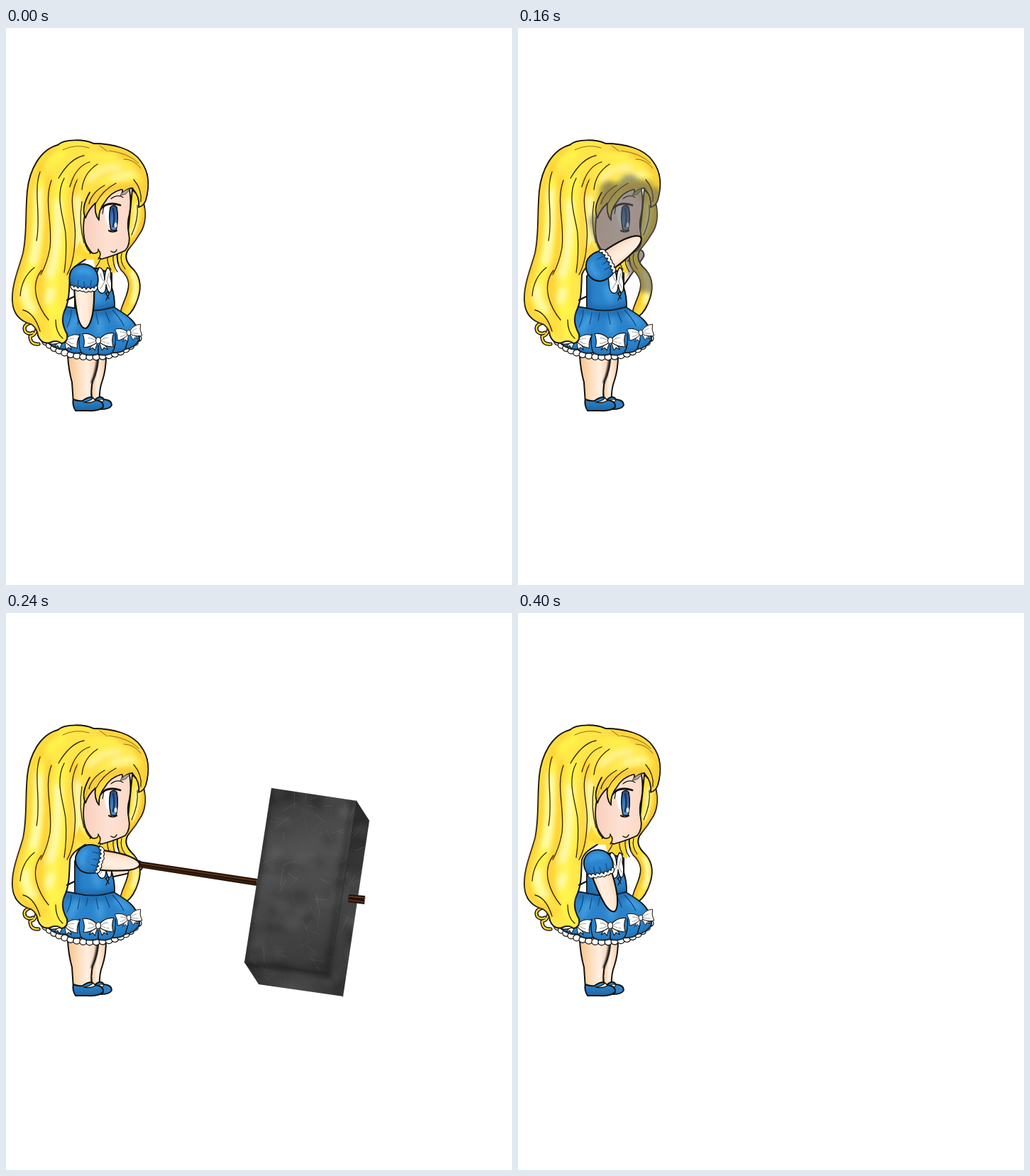
Write an HTML page with a canvas that moves like this. It is 713 px wide and 786 px high and loops after 0.48 s.

```html
<!DOCTYPE html>
<html lang="en">
<head>
<meta charset="utf-8">
<title>Girl with hammer</title>
<style>
  html, body { margin: 0; width: 100%; height: 100%; overflow: hidden; background: #fff; }
  canvas { display: block; }
</style>
</head>
<body>
<canvas id="stage" width="713" height="786"></canvas>
<script>
const ctx = document.getElementById('stage').getContext('2d');
const INK = '#14110c', BROWN = '#33250a', BLUE = '#2a83cb', NAVY = '#10487f', SKIN = '#ffe6d2';
const STEP = 80;

// near arm: shoulder and angle; far arm: from, to
const POSES = [
  { arm: [110, 348, 90] },
  { arm: [112, 341, -11], far: [142, 362, 183, 335] },
  { arm: [111, 339, -34], far: [142, 360, 170, 320], smoke: true },
  { arm: [113, 346, 8], far: [140, 367, 185, 357], hammer: true },
  { arm: [115, 348, 43], far: [142, 360, 174, 396] },
  { arm: [112, 349, 73] }
];

function shape(d, fill, line = INK, width = 2) {
  const p = new Path2D(d);
  if (fill) { ctx.fillStyle = fill; ctx.fill(p); }
  if (line) { ctx.strokeStyle = line; ctx.lineWidth = width; ctx.stroke(p); }
}

function lines(list, color = INK, width = 1.5) {
  list.forEach(d => shape(d, null, color, width));
}

function ribbon(list, color, width, edge) {
  lines(list, INK, width + edge);
  lines(list, color, width);
}

function within(d, draw) {
  ctx.save();
  ctx.clip(new Path2D(d));
  draw();
  ctx.restore();
}

function soft(list, color, width, blur) {
  ctx.save();
  ctx.filter = `blur(${blur}px)`;
  lines(list, color, width);
  ctx.restore();
}

function blob(x, y, rx, ry, fill, line, width = 1.5) {
  ctx.beginPath();
  ctx.ellipse(x, y, rx, ry, 0, 0, 7);
  ctx.fillStyle = fill;
  ctx.fill();
  if (line) { ctx.strokeStyle = line; ctx.lineWidth = width; ctx.stroke(); }
}

function fade(x0, y0, x1, y1, ...colors) {
  const g = ctx.createLinearGradient(x0, y0, x1, y1);
  colors.forEach((c, i) => g.addColorStop(i / (colors.length - 1), c));
  return g;
}

function seeded(s) {
  return () => (s = (s * 16807) % 2147483647) / 2147483647;
}

function bow(x, y, size, turn) {
  ctx.save();
  ctx.translate(x, y);
  ctx.rotate(turn);
  ctx.scale(size, size);
  for (const side of [-1, 1]) {
    ctx.save();
    ctx.scale(side, 1);
    shape('M1 2 L5 14 L8 10 L13 13 Q10 6 3 1Z', '#fff', INK, 1);
    shape('M2 -2 C8 -9 15 -11 22 -10 Q18 -1 21 9 Q12 10 2 3Z', '#fff', INK, 1.1);
    lines(['M5 -1 Q10 -4 14 -4', 'M5 1 Q10 4 15 4'], '#999', 1);
    ctx.restore();
  }
  blob(0, 0, 3.5, 4.5, '#fff', INK, 1.1);
  ctx.restore();
}

function farArm([x0, y0, x1, y1]) {
  ribbon([`M${x0} ${y0} L${x1} ${y1}`], SKIN, 13, 4);
}

function sideLock() {
  const d = 'M178 228 L193 243 Q200 268 191 286 Q183 300 172 313 Q165 325 176 337 C190 350 191 366 186 381 ' +
    'Q180 400 170 407 Q160 405 162 399 C165 386 173 376 173 361 Q172 350 162 341 Q155 331 157 315 L172 288Z';
  shape(d, '#ffe140');
  within(d, () => {
    soft(['M195 254 Q196 280 172 309', 'M160 335 Q180 355 174 375 L164 400'], '#f6bb2a', 4, 2);
    soft(['M184 250 Q184 275 178 290', 'M178 346 Q187 362 179 386'], '#fffbb0', 6, 2);
  });
  lines(['M185 250 Q187 270 177 292', 'M163 318 Q160 330 168 340'], BROWN, 1.2);
}

function legs() {
  shape('M118 462 Q124 490 120 512 L121 526 L132 525 Q131 510 136 497 Q141 482 141 462Z',
    fade(118, 0, 140, 0, '#f0bd96', '#fff2e4', '#f6cca6'));
  shape('M87 462 Q88 482 93 500 L95 530 L121 530 Q119 512 122 498 Q130 482 130 462Z',
    fade(88, 0, 128, 0, '#f9c393', '#fddbb8', '#fff0e0', '#f8d3b2'));
  soft(['M121 500 Q127 486 129 468'], '#222', 3, .8);
  shape('M123 527 Q133 516 138 524 Q149 525 149 532 Q147 538 134 538Z', BLUE);
  shape('M131 525 Q135 522 138 526 Q134 529 131 529Z', SKIN, INK, 1);
  shape('M95 524 Q101 527 108 526 Q114 521 121 521 L125 525 Q138 526 137 535 Q131 541 115 540 L98 540 Q93 532 95 524Z',
    fade(0, 522, 0, 541, '#2d8bd6', '#1d639f'));
  shape('M109 528 Q119 530 126 526 L123 522 Q116 528 109 528Z', SKIN, INK, 1.2);
}

function lace() {
  const n = 17;
  for (let i = 0; i <= n; i++) {
    const t = i / n, u = 1 - t;
    const at = (a, b, c, e) => u * u * u * a + 3 * u * u * t * b + 3 * u * t * t * c + t * t * t * e;
    blob(at(56, 84, 162, 186), at(443, 471, 474, 438), 5, 4.5, '#fff', INK, 1.2);
  }
}

function skirt() {
  const d = 'M84 393 Q118 401 152 394 C165 402 178 410 183 420 Q188 427 188 440 Q180 452 168 453 Q162 459 150 458 ' +
    'Q140 464 130 460 Q115 464 106 458 Q92 461 84 453 Q70 455 57 442 Q58 430 70 418 Q79 405 84 393Z';
  lace();
  shape(d, BLUE);
  within(d, () => {
    soft(['M66 450 Q125 480 186 446', 'M82 398 Q118 407 154 399'], '#1c68ac', 7, 4);
    soft(['M100 408 L90 427', 'M132 412 L132 428', 'M156 406 L170 416'], '#4aa3e2', 9, 4);
  });
  lines(['M92 398 Q92 410 86 422', 'M104 402 L101 418', 'M115 402 L113 413', 'M127 402 L130 418',
    'M140 400 L146 415', 'M150 398 Q160 408 166 420'], NAVY, 1.2);
  lines(['M106 458 Q101 446 104 432', 'M130 460 L130 448', 'M150 458 Q156 446 154 432', 'M168 453 L172 440'], INK, 1.4);
  bow(82, 440, .95, .15);
  bow(130, 441, 1, -.02);
  bow(173, 430, .84, -.2);
}

const BACK = 'M123 163 C112 157 82 156 73 165 C48 172 33 200 30 230 C27 262 30 290 24 318 C18 340 8 362 9 385 ' +
  'C10 403 20 414 36 418 Q44 424 45 434 Q50 447 62 444 ' +
  'Q72 439 78 445 Q88 443 86 432 C81 423 77 412 82 400 C90 385 89 365 90 348 C94 335 106 332 118 322 L130 250 L160 180Z';

function backHair() {
  ribbon(['M35 416 Q23 419 27 428 Q31 433 38 430', 'M43 425 Q41 434 34 435 Q34 447 46 446'], '#fdd32e', 2.4, 2.8);
  shape(BACK, '#ffe84a');
  within(BACK, () => {
    soft(['M68 172 C28 205 38 260 30 310 Q12 350 13 390 Q28 412 50 425', 'M60 210 C52 260 64 300 48 350 Q40 385 66 425',
      'M98 210 C88 255 104 300 86 345'], '#fcc02c', 6, 4);
    soft(['M48 215 C40 260 50 300 34 345 Q22 375 34 400', 'M80 215 C66 260 84 300 70 345 Q60 380 74 405',
      'M62 390 Q62 425 76 436', 'M60 190 L78 178'], '#fff64a', 11, 4);
    soft(['M46 230 Q48 290 38 330', 'M73 245 Q76 300 62 350', 'M101 240 L103 305', 'M28 365 Q24 385 38 398',
      'M64 370 L60 385'], '#fffcc8', 9, 4);
  });
  lines(['M48 203 C38 230 50 265 43 300', 'M64 215 C53 245 66 275 62 310 Q58 332 49 348',
    'M82 212 C68 238 82 270 84 290 Q86 320 82 345', 'M101 213 C84 245 101 270 97 300 Q96 330 86 348',
    'M20 378 Q22 352 40 338', 'M50 342 C32 365 46 395 60 412', 'M24 398 Q40 402 48 428',
    'M70 412 Q70 430 80 438', 'M107 245 Q102 275 110 303'], BROWN, 1.3);
}

function bodice() {
  shape('M122 320 L155 316 L154 346 L126 340Z', '#fbd83a', null);
  lines(['M134 324 Q131 332 127 337', 'M143 322 Q142 332 148 341', 'M151 320 Q150 335 157 344'], BROWN, 1.3);
  lines(['M86 384 L98 378'], INK, 2.2);
  const d = 'M97 350 Q104 341 118 340 Q128 337 136 342 L149 346 L149 366 Q153 378 153 393 Q125 403 97 395Z';
  shape(d, BLUE);
  within(d, () => {
    soft(['M98 355 L98 394 Q125 403 154 391'], '#175b9c', 6, 4);
    soft(['M125 366 L130 383'], '#46a0e2', 9, 4);
  });
  shape('M139 356 Q138 338 131 338 Q126 350 128 358 Q128 372 134 374 Q141 376 141 362 Q144 378 148 371 Q150 360 147 352 Q149 340 143 338 Q139 344 139 356Z', '#fff', INK, 1.4);
  lines(['M133 346 Q135 356 139 358 L133 368', 'M145 346 L142 358 L146 366'], '#888', 1);
  lines(['M140 375 Q145 370 145 376 L141 384', 'M141 375 L145 382'], INK, 1.3);
}

function eye() {
  shape('M138 253 Q138 270 146 282 L148 250Z', '#fff', null);
  shape('M147 253 Q152 248 156 253 Q159 268 155 286 L148 285 Q144 268 147 253Z',
    fade(0, 250, 0, 286, '#274f8e', '#3c74ba', '#5b98d8'), INK, 1.6);
  shape('M151 255 Q154 267 151 280', null, '#17345f', 2.6);
  blob(154.5, 278, 1.8, 3.5, '#fff');
  lines(['M133 256 Q142 244 161 250'], INK, 2.8);
  lines(['M145 286 Q150 289 156 286'], INK, 2.2);
  lines(['M138 251 L136 262', 'M148 241 Q157 234 165 239'], INK, 1.2);
}

function face() {
  shape('M118 242 C108 265 107 288 112 303 Q120 321 135 326 Q156 320 168 314 Q176 305 173 290 Q170 276 174 262 ' +
    'Q177 246 174 228 L140 222Z', fade(110, 0, 176, 0, '#f9cfbc', '#fee1d2', '#fcd8c8'), INK, 1.8);
  eye();
  lines(['M148 315 Q153 319 156 313'], INK, 1.5);
  shape('M104 300 C107 316 117 321 125 318 Q131 317 130 312 Q136 317 130 325 Q114 332 98 318Z', '#ffd93a', null);
  lines(['M111 302 Q115 318 125 318 Q131 317 130 312', 'M130 313 Q136 319 130 326'], INK, 1.4);
}

function crown() {
  const d = 'M90 170 L122 163 C150 163 178 170 190 188 C203 205 202 225 197 243 Q194 251 187 253 Q189 238 178 226 ' +
    'Q171 226 163 234 Q166 227 162 228 Q147 232 139 246 Q130 257 131 271 Q124 262 126 247 Q116 256 112 268 Q107 256 108 244 L76 205Z';
  ctx.save();
  ctx.clip(new Path2D('M96 150 H210 V280 H104 L106 220 L80 200Z'));
  shape(d, fade(80, 0, 125, 0, 'rgba(255,228,70,0)', '#ffe046'), null);
  ctx.restore();
  within(d, () => {
    soft(['M135 170 Q178 174 198 215 L194 245', 'M112 260 Q118 232 160 224 L184 224'], '#f8bd30', 6, 4);
    soft(['M116 206 Q140 180 176 196', 'M135 218 Q160 204 186 210', 'M120 182 L152 180'], '#fff250', 10, 5);
    soft(['M118 214 Q138 194 160 198', 'M150 212 L178 206'], '#fff9b4', 7, 4);
  });
  lines(['M123 163 C150 163 178 170 190 188 C203 205 202 225 197 243 Q194 251 187 253 Q189 238 178 226',
    'M178 226 Q171 226 163 234 Q166 227 162 228 Q147 232 139 246 Q130 257 131 271 Q124 262 126 247 Q116 256 112 268 Q105 255 118 232'], INK, 1.8);
  lines(['M139 222 Q121 232 117 248', 'M155 219 Q136 229 127 247', 'M180 214 Q192 228 190 245', 'M110 180 Q90 184 74 212',
    'M118 189 Q98 195 90 224', 'M129 192 Q109 205 107 228'], BROWN, 1.3);
  lines(['M145 173 Q174 177 187 191', 'M166 185 Q180 185 190 198', 'M80 172 Q98 163 117 169', 'M132 166 L143 174'], '#8a6b1c', 1);
  shape('M161 236 Q166 228 175 227 L169 234Z', '#aaa596', '#4a4433', 1);
}

// haze tints only what is already drawn
function smoke() {
  const rnd = seeded(41);
  ctx.save();
  ctx.clip(new Path2D('M96 200 H215 V378 H154 V330 H96Z'));
  ctx.globalCompositeOperation = 'source-atop';
  ctx.filter = 'blur(3px)';
  const p = new Path2D('M114 240 Q116 214 130 216 Q142 222 148 209 Q162 202 170 214 Q186 213 188 224 Q204 222 208 250 ' +
    'L206 378 L164 370 L150 330 L116 318 Q106 290 101 276 Q99 263 110 263Z');
  ctx.fillStyle = 'rgba(88,90,90,.56)';
  ctx.fill(p);
  for (let i = 0; i < 14; i++) {
    blob(122 + rnd() * 70, 218 + rnd() * 22, 3 + rnd() * 6, 2 + rnd() * 4, 'rgba(120,112,60,.14)');
  }
  ctx.restore();
}

function hammer() {
  const rnd = seeded(97);
  const front = 'M374 247 L494 265 L456 512 L336 493Z';
  const side = 'M494 265 L512 293 L475 541 L456 512Z';
  const base = 'M336 493 L456 512 L475 541 L356 524Z';
  shape('M187 350 L354 375 L353 385 L187 359Z', '#241408', null);
  lines(['M188 353 L353 378'], '#6b3a17', 1.6);
  lines(['M188 357 L353 382'], '#432310', 1.4);
  shape(front, fade(374, 247, 440, 512, '#363636', '#515151', '#484848', '#363636'), null);
  shape(side, fade(503, 280, 465, 525, '#2b2b2b', '#454545', '#383838'), null);
  shape(base, fade(340, 500, 470, 530, '#2c2c2c', '#4c4c4c', '#343434'), null);
  within(front + side + base, () => {
    ctx.save();
    ctx.filter = 'blur(4px)';
    for (let i = 0; i < 90; i++) {
      blob(340 + rnd() * 170, 250 + rnd() * 290, 4 + rnd() * 13, 3 + rnd() * 8, i % 2 ? 'rgba(15,15,15,.18)' : 'rgba(130,130,130,.15)');
    }
    ctx.restore();
    for (let i = 0; i < 120; i++) {
      const x = 340 + rnd() * 160, y = 252 + rnd() * 275, a = rnd() * 6.3, r = 5 + rnd() * 24;
      lines([`M${x} ${y} l${r * Math.cos(a)} ${r * Math.sin(a)}`], `rgba(185,185,185,${.06 + rnd() * .2})`, .7);
    }
    soft(['M374 247 L336 493 L456 512'], 'rgba(15,15,15,.45)', 7, 3);
    soft(['M488 266 L452 510'], 'rgba(15,15,15,.3)', 8, 3);
  });
  lines(['M494 265 L456 512 L475 541', 'M336 493 L456 512'], '#292929', 1);
  shape('M483 397 L506 399 L505 411 L482 408Z', '#24130a', null);
  lines(['M484 400 L506 402', 'M483 405 L505 408'], '#6a3c22', 1.5);
}

// drawn hanging down from the shoulder, then turned
function nearArm([x, y, angle]) {
  ctx.save();
  ctx.translate(x, y);
  ctx.rotate((angle - 90) * Math.PI / 180);
  shape('M-14 16 Q-13 43 -8 63 Q-4 76 2 76 Q8 74 12 56 Q15 38 14 16Z',
    fade(-14, 0, 14, 0, '#fad6b8', '#fff0e2', '#ffe8d6', '#fad3b4'), INK, 2.2);
  const sleeve = 'M-18 17 Q-23 4 -18 -6 Q-12 -15 0 -15 Q13 -13 18 -3 Q22 8 17 19 Q0 22 -18 17Z';
  shape(sleeve, BLUE);
  within(sleeve, () => {
    soft(['M-20 8 L-16 19 Q0 23 18 18'], '#1a5fa4', 6, 3);
    soft(['M-8 -4 Q2 -9 9 -2'], '#44a0e4', 7, 3);
  });
  lines(['M-9 16 L-8 8', 'M0 18 L0 10', 'M9 17 L10 8'], NAVY, 1.2);
  ribbon(['M-17 17 q2 5 5 1 q3 6 6 1 q3 5 6 1 q3 6 6 0 q3 5 6 0 q3 4 5 -2'], '#fff', 3, 2.2);
  ctx.restore();
}

function render({ arm, far, smoke: hazy, hammer: armed }) {
  ctx.clearRect(0, 0, 713, 786);
  ctx.lineCap = ctx.lineJoin = 'round';
  if (far) farArm(far);
  sideLock();
  legs();
  skirt();
  backHair();
  bodice();
  face();
  crown();
  if (hazy) smoke();
  if (armed) hammer();
  nearArm(arm);
}

let shown = -1;
const start = performance.now();
function tick() {
  const pose = Math.floor((performance.now() - start) / STEP) % POSES.length;
  if (pose !== shown) render(POSES[shown = pose]);
  requestAnimationFrame(tick);
}
tick();
</script>
</body>
</html>
```
